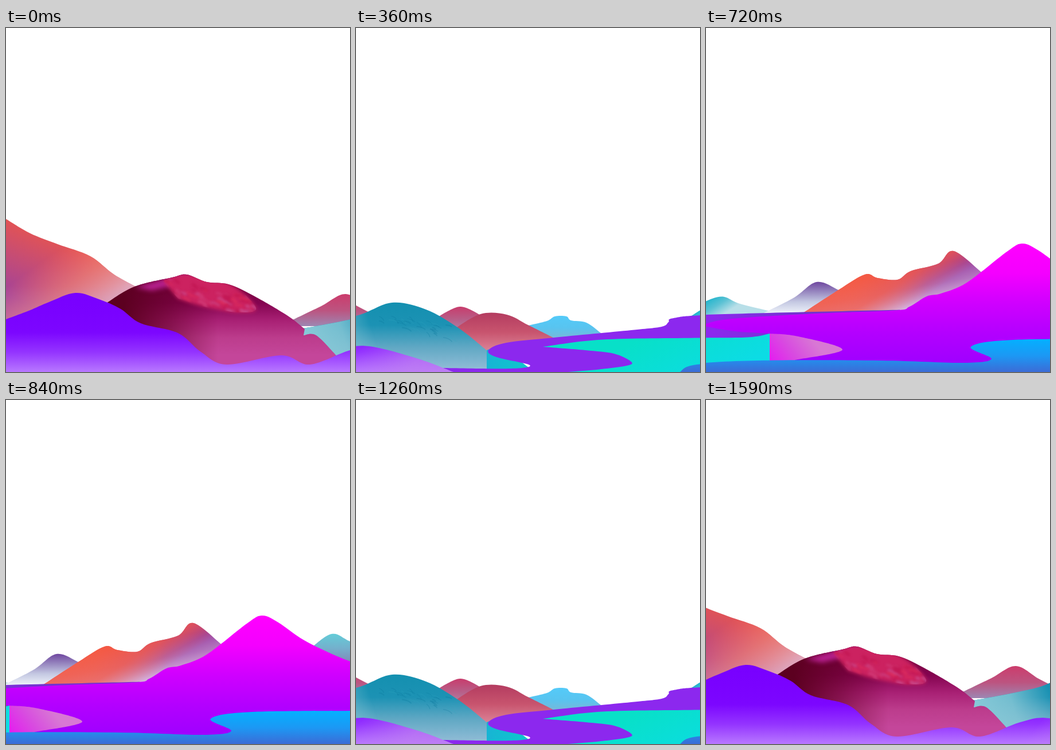
These frames come from a looping animation (600x600 px, 1620 ms). An HTML page with a canvas:

```html
<!DOCTYPE html>
<html lang="en">
<head>
<meta charset="utf-8">
<title>Mountain panorama</title>
<style>
  html, body { margin: 0; width: 100%; height: 100%; overflow: hidden; background: #fff; }
  canvas { display: block; width: 600px; height: 600px; }
</style>
</head>
<body>
<canvas width="600" height="600"></canvas>
<script>
const STEP = 30, HALF = 27, TRAVEL = 1413, SIZE = 600;
const stage = document.querySelector('canvas').getContext('2d');
const scene = document.createElement('canvas');
scene.width = SIZE + TRAVEL;
scene.height = SIZE;
const ctx = scene.getContext('2d');

let seed = 7;
const random = () => (seed = seed * 16807 % 2147483647) / 2147483647;

function addStops(gradient, colors) {
  colors.forEach((color, i) => gradient.addColorStop(i / (colors.length - 1), color));
  return gradient;
}
const linear = (x1, y1, x2, y2, ...colors) => addStops(ctx.createLinearGradient(x1, y1, x2, y2), colors);
const down = (y1, y2, ...colors) => linear(0, y1, 0, y2, ...colors);
const across = (x1, x2, ...colors) => linear(x1, 0, x2, 0, ...colors);

// Each part is a smooth curve through flat x, y pairs; straight lines join the parts.
function outline(parts) {
  const path = new Path2D();
  parts.forEach((flat, n) => {
    const p = [];
    for (let i = 0; i < flat.length; i += 2) p.push([flat[i], flat[i + 1]]);
    path[n ? 'lineTo' : 'moveTo'](...p[0]);
    for (let i = 0; i < p.length - 1; i++) {
      const b = p[i], c = p[i + 1], a = p[i - 1] || b, d = p[i + 2] || c;
      path.bezierCurveTo(
        b[0] + (c[0] - a[0]) / 6, b[1] + (c[1] - a[1]) / 6,
        c[0] - (d[0] - b[0]) / 6, c[1] - (d[1] - b[1]) / 6, ...c);
    }
  });
  path.closePath();
  return path;
}

function shape(dx, parts, ...fills) {
  ctx.setTransform(1, 0, 0, 1, dx, 0);
  const path = outline(parts);
  for (const fill of fills) {
    ctx.fillStyle = fill;
    ctx.fill(path);
  }
  return path;
}

// A hill: a skyline that drops straight to its base line at both ends.
const hill = (dx, base, skyline, ...fills) =>
  shape(dx, [skyline, [skyline.at(-2), base, skyline[0], base]], ...fills);

// Short random strokes along a downhill band, kept inside a path.
function texture(path, { count, colors, x, y, length, slope, depth, width, blur }) {
  ctx.save();
  ctx.clip(path);
  ctx.filter = `blur(${blur}px)`;
  for (let i = 0; i < count; i++) {
    const along = random() * length, sx = x + along, sy = y + along * slope + random() * depth;
    const w = 6 + random() * 10, h = 3 + random() * 6;
    ctx.strokeStyle = colors[i % colors.length];
    ctx.lineWidth = width * (.6 + random() * .8);
    ctx.beginPath();
    ctx.moveTo(sx, sy);
    ctx.quadraticCurveTo(sx + w * .7, sy + h * .2, sx + w, sy + h);
    ctx.stroke();
  }
  ctx.restore();
}

function drawFarHills() {
  hill(0, 520, [0, 333, 42, 358, 90, 377, 147, 398, 190, 431, 240, 458],
    linear(60, 350, 10, 470, '#e65450', '#c44c76', '#a2429a'),
    linear(95, 385, 165, 485, '#ff786800', '#f0887c99', '#e0a4b8'),
    down(450, 510, '#c080c000', '#c080c044'));
  hill(0, 520, [500, 509, 550, 485, 592, 464, 632, 486, 665, 503],
    down(464, 521, '#cc3c6c', '#bc5480', '#9c88b4'));
  hill(628, 530, [140, 506, 160, 494, 182, 486, 205, 494, 230, 510],
    down(486, 528, '#c83c6c', '#b85c86', '#b080a4'));
  hill(628, 545, [300, 519, 333, 511, 347, 503, 367, 503, 375, 510, 402, 514, 427, 532],
    down(503, 542, '#54caf8', '#58c4f0', '#78b8d8'));
  hill(628, 570, [170, 526, 217, 499, 263, 500, 300, 518, 346, 541],
    down(497, 564, '#b43c60', '#c8546e', '#dc8498'));
  hill(1047, 506, [160, 506, 195, 484, 220, 472, 241, 469, 265, 480, 300, 489, 345, 499],
    linear(215, 470, 235, 502, '#1eb4cc', '#5cc2d4', '#b8dfe8'));
  hill(1047, 500, [310, 497, 363, 470, 402, 443, 440, 457, 470, 475],
    down(443, 495, '#7048a0', '#9888c0', '#c4c8e2', '#e8ecf6'));
  hill(1361, 500, [60, 500, 126, 457, 172, 430, 194, 436, 229, 439, 252, 424, 300, 411, 327, 389, 379, 429, 400, 445],
    linear(235, 405, 275, 480, '#f05444', '#c0447c', '#983c9c', '#a058b0'),
    across(150, 280, '#ff603ccc', '#ff603c00'),
    linear(195, 430, 207, 496, '#d8b4dc00', '#d8b4dc55', '#d8b8e0ee'),
    linear(322, 388, 345, 425, '#f05848aa', '#f0584800'));
  hill(1361, 490, [530, 434, 568, 408, 600, 421, 655, 446],
    down(408, 458, '#64ccd8', '#74b0cc', '#8088b8'));
}

function drawTealMountain() {
  const path = hill(628, SIZE, [-130, 527, -76, 518, 4, 501, 63, 479, 122, 491, 180, 524, 230, 564],
    down(480, 595, '#1490b0', '#1c92b4', '#60a8c4', '#90bcd6'),
    linear(-110, 540, 20, 500, '#88cad8', '#88c8d6cc', '#88c8d600'));
  texture(path, {
    count: 34, colors: ['#0c7c9e55', '#38a8c433', '#0a749844'],
    x: 40, y: 487, length: 130, slope: .24, depth: 26, width: 1.4, blur: .4
  });
}

function drawValley() {
  shape(628, [[228, 562, 250, 553], [306, 596, 228, 596]], across(228, 300, '#18b4d4', '#0cc8cc'));
  // Winding violet river bank
  shape(628, [
    [152, 593, 270, 594, 303, 588, 245, 574, 231, 562, 262, 549, 345, 540, 480, 527,
      533, 521, 545, 513, 554, 506, 629, 500, 966, 491.5],
    [980, 530, 739, SIZE], [152, SIZE]
  ], across(640, 800, '#8c28ee', '#7034cc'));
  // Turquoise lake
  shape(628, [
    [326, 556, 430, 543.5, 600, 540.5, 700, 539.5, 739, 533], [739, SIZE, 370, SIZE],
    [420, 596, 472, 589, 480, 582, 450, 568, 400, 562, 326, 556]
  ], linear(520, 530, 570, 640, '#08e0c8', '#0cdce4'));
  // Magenta plain and peak
  shape(1361, [
    [-114, 519, -64, 507.5, 86, 498, 225, 492.5, 250, 486, 280, 468, 305, 463, 350, 444,
      420, 390, 447, 376, 475, 388, 520, 419, 585, 450, 655, 475],
    [655, SIZE, 6, SIZE], [6, 533, -54, 529, -114, 519]
  ], down(376, 582, '#ff00ff', '#f400ff', '#d000ff', '#b400ff', '#a000ff'));
  shape(1361, [[6, 533, 56, 538, 133, 561, 50, 579], [50, 582, 6, 582]],
    linear(10, 585, 75, 535, '#e41cf0', '#d84ce0', '#d878d4'));
  // Blue river
  shape(1361, [
    [-168, SIZE, -139, 587, -14, 580, 200, 580, 345, 584, 393, 577, 357, 556, 430, 544, 655, 542],
    [655, SIZE]
  ], down(543, SIZE, '#04b0ff', '#1c98f4', '#3c6cd6'));
}

function drawCrimsonMountain() {
  const path = shape(0, [
    [165, 487, 222, 452, 290, 435, 315, 430, 350, 443, 388, 447, 430, 466, 490, 501, 521, 525],
    [519, 536, 541, 536, 576, 571], [576, SIZE, 165, SIZE]
  ],
    down(450, 570, '#780040', '#840450', '#a82074', '#bc3c8c', '#c4469a'),
    across(205, 370, '#5c0020', '#64002888', '#70003000'));
  ctx.save();
  ctx.clip(path);
  ctx.filter = 'blur(4px)';
  shape(0, [[225, 452, 310, 430, 320, 440, 255, 458]], '#b82090');
  ctx.filter = 'blur(3px)';
  const snow = shape(0, [[274, 441, 315, 429, 390, 446, 436, 488, 405, 496, 345, 486, 300, 472]], '#cc2260');
  texture(snow, {
    count: 60, colors: ['#dc2c5ccc', '#cc5498aa', '#c01450cc', '#d44480aa'],
    x: 265, y: 430, length: 165, slope: .24, depth: 34, width: 4, blur: 2
  });
  ctx.restore();
}

function drawForeground() {
  hill(0, SIZE, [0, 508, 40, 493, 75, 478, 121, 462, 162, 473, 200, 490, 235, 515, 300, 532, 340, 565,
    385, 587, 480, 571, 530, 587, 600, 562, 650, 555, 733, 576, 798, 600],
    down(462, SIZE, '#7800ff', '#7a02ff', '#7c06ff', '#9434ff', '#b878ff'),
    linear(640, 555, 710, 610, '#c080f000', '#c080f0aa'));
}

drawFarHills();
drawTealMountain();
drawValley();
drawCrimsonMountain();
drawForeground();

// The view pans right and back at constant speed in 30 ms steps.
const start = performance.now();
function render() {
  const step = Math.floor(Math.max(0, performance.now() - start) / STEP) % (2 * HALF);
  const pan = Math.round((HALF - Math.abs(HALF - step)) * TRAVEL / HALF);
  stage.clearRect(0, 0, SIZE, SIZE);
  stage.drawImage(scene, -pan, 0);
  requestAnimationFrame(render);
}
render();
</script>
</body>
</html>
```
